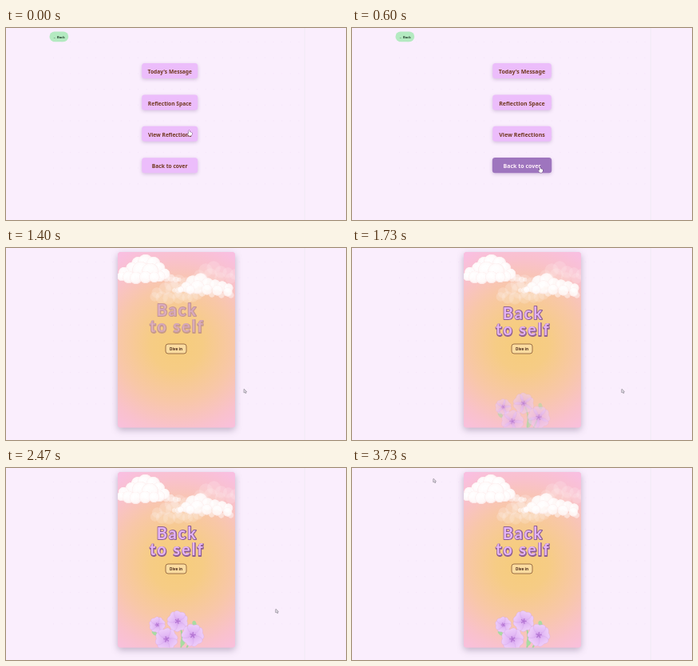
Write an HTML page with a canvas that moves like this. It is 426x240 px and loops after 3.79 s.

```html
<!DOCTYPE html>
<html lang="en">
<head>
<meta charset="utf-8">
<title>Back to self</title>
<style>
  html, body { margin: 0; width: 100%; height: 100%; overflow: hidden; background: #faeefd; }
  canvas { display: block; width: 100vw; height: 100vh; }
</style>
</head>
<body>
<canvas id="stage" width="426" height="240"></canvas>
<script>
const ctx = document.getElementById('stage').getContext('2d');
const LOOP = 3790;
const COVER_AT = 1000;
const FONT = '"Noto Sans", "Open Sans", sans-serif';
const TITLE_FONT = 'Lato, sans-serif';
const COVER = { x: 140, y: 5, w: 147, h: 219.5 };
const MENU = ["Today's Message", 'Reflection Space', 'View Reflections', 'Back to cover'];

const clamp = v => Math.max(0, Math.min(1, v));
const span = (t, from, to) => clamp((t - from) / (to - from));
const mix = (a, b, p) => a + (b - a) * p;
const easeOut = p => 1 - (1 - p) ** 2;
const easeInOut = p => p * p * (3 - 2 * p);
const mixColor = (a, b, p) => `rgb(${a.map((v, i) => Math.round(mix(v, b[i], p)))})`;

function isolated(draw) {
  ctx.save();
  draw();
  ctx.restore();
}

function roundBox(x, y, w, h, r) {
  ctx.beginPath();
  ctx.roundRect(x, y, w, h, r);
}

function ellipse(x, y, rx, ry, angle = 0) {
  ctx.beginPath();
  ctx.ellipse(x, y, rx, ry, angle, 0, Math.PI * 2);
  ctx.fill();
}

function label(text, x, y, size, color, weight = 800, font = FONT) {
  ctx.font = `${weight} ${size}px ${font}`;
  ctx.textAlign = 'center';
  ctx.textBaseline = 'alphabetic';
  ctx.fillStyle = color;
  ctx.fillText(text, x, y);
}

function shadow(color, blur, dy) {
  ctx.shadowColor = color;
  ctx.shadowBlur = blur;
  ctx.shadowOffsetY = dy;
}

function drawPaper() {
  ctx.fillStyle = '#faeefd';
  ctx.fillRect(0, 0, 426, 240);
  ctx.fillStyle = 'rgba(205, 170, 220, 0.13)';
  for (let y = 17; y < 200; y += 19.7)
    for (let x = 59; x < 373; x += 10.6) ctx.fillRect(x, y, 1, 1);
  ctx.fillStyle = '#f3ebf7';
  ctx.fillRect(373.5, 0, 1.5, 240);
}

function drawMenuButton(text, y, hover) {
  const grow = hover * 0.7;
  isolated(() => {
    shadow('rgba(125, 85, 150, 0.3)', 4, 1.5);
    ctx.fillStyle = mixColor([236, 189, 251], [101, 64, 144], hover);
    roundBox(176.2 - grow, y - grow * 0.3, 73.6 + grow * 2, 19 + grow * 0.6, 3.5);
    ctx.fill();
  });
  label(text, 213, y + 13.2, 7, mixColor([112, 56, 30], [255, 240, 250], clamp(hover * 1.8)));
}

function drawMenu(t) {
  ctx.fillStyle = '#b4eac1';
  roundBox(54.5, 4.5, 23.7, 12.7, 6.3);
  ctx.fill();
  label('← Back', 66.3, 12.6, 4, '#1f3a28');

  // The page finishes turning around its left edge.
  const turn = mix(0.951, 1, easeOut(span(t, 60, 270)));
  isolated(() => {
    ctx.translate(54, 0);
    ctx.scale(turn, 1);
    ctx.translate(-54, 0);
    MENU.forEach((text, i) =>
      drawMenuButton(text, 44 + i * 39.4, i === 3 ? span(t, 400, 750) : 0));
  });
}

// Each puff is [x, y, radius]; a soft lower rim gives it volume.
function drawCloud(x, y, alpha, puffs) {
  isolated(() => {
    ctx.globalAlpha = alpha;
    ctx.translate(x, y);
    for (const [px, py, r] of puffs) {
      const fluff = ctx.createRadialGradient(px - r * 0.15, py - r * 0.25, r * 0.3, px, py, r);
      fluff.addColorStop(0, '#ffffff');
      fluff.addColorStop(0.7, 'rgba(255, 251, 251, 0.97)');
      fluff.addColorStop(0.92, 'rgba(253, 238, 238, 0.85)');
      fluff.addColorStop(1, 'rgba(253, 232, 232, 0)');
      ctx.fillStyle = fluff;
      ellipse(px, py, r, r);
    }
  });
}

const LEFT_PUFFS = [
  [25, 11, 9], [34, 9, 10], [44, 11, 9], [51, 17, 8], [17, 17, 8], [7, 22, 7], [4, 27, 6],
  [58, 24, 7], [52, 27, 7], [28, 19, 11], [40, 21, 11], [13, 28, 8], [22, 29, 8], [34, 28, 8], [45, 28, 7]
];
const LEFT_TAIL = [[60, 29, 5], [66, 29, 5], [72, 31, 4], [76, 31, 3]];
const RIGHT_PUFFS = [
  [28, 12, 9], [38, 9, 9], [47, 14, 8], [20, 18, 7], [56, 15, 7], [65, 17, 7],
  [73, 19, 6], [13, 21, 4], [34, 18, 9], [46, 21, 7], [59, 22, 7], [72, 24, 6], [25, 21, 6]
];
const RIGHT_TAIL = [[5, 22, 3], [10, 22, 4], [40, 25, 5], [52, 27, 4], [64, 28, 4], [76, 28, 4]];

function drawClouds(t) {
  const drift = -(t - COVER_AT) / 2700;
  drawCloud(182 - drift, 34, 0.2, LEFT_PUFFS);
  drawCloud(222 - drift, 16, 0.17, RIGHT_PUFFS);
  drawCloud(141 + drift, 8.5, 0.5, LEFT_TAIL);
  drawCloud(141 + drift, 8.5, 0.96, LEFT_PUFFS);
  drawCloud(206 + drift * 0.6, 31, 0.5, RIGHT_TAIL);
  drawCloud(206 + drift * 0.6, 31, 0.9, RIGHT_PUFFS);
}

function drawPetal(r) {
  const color = ctx.createLinearGradient(0, 0, 0, -r);
  color.addColorStop(0, '#cf97e8');
  color.addColorStop(0.35, '#e2b9f5');
  color.addColorStop(1, '#efd0fa');
  ctx.fillStyle = color;
  ctx.strokeStyle = 'rgba(205, 155, 228, 0.55)';
  ctx.lineWidth = 0.5;
  ctx.beginPath();
  ctx.moveTo(0, 0);
  ctx.bezierCurveTo(-r * 0.8, -r * 0.5, -r * 0.65, -r * 1.15, 0, -r * 0.9);
  ctx.bezierCurveTo(r * 0.65, -r * 1.15, r * 0.8, -r * 0.5, 0, 0);
  ctx.fill();
  ctx.stroke();
}

function drawFlower(x, y, r, turn) {
  isolated(() => {
    ctx.translate(x, y);
    ctx.rotate(turn);
    for (let i = 0; i < 5; i++) {
      ctx.rotate(Math.PI * 2 / 5);
      drawPetal(r);
    }
    ctx.fillStyle = '#b273d2';
    for (let i = 0; i < 5; i++) {
      ctx.rotate(Math.PI * 2 / 5);
      ellipse(0, -r * 0.14, r * 0.05, r * 0.16);
    }
  });
}

function drawFlowers(t) {
  const grow = span(t, 1450, 1980);
  if (!grow) return;
  isolated(() => {
    ctx.globalAlpha = grow;
    ctx.translate(0, 12 * (1 - easeOut(grow)));
    ctx.strokeStyle = '#a3d59b';
    ctx.lineWidth = 2;
    ctx.beginPath();
    ctx.moveTo(217, 196);
    ctx.quadraticCurveTo(223, 208, 219, 226);
    ctx.moveTo(232, 212);
    ctx.lineTo(226, 226);
    ctx.stroke();
    ctx.fillStyle = '#a9dba2';
    ellipse(222, 216, 3, 7, 0.3);
    ellipse(236, 195, 2.5, 4, -0.2);
    ellipse(186, 206, 2.5, 4, -0.7);
    drawFlower(189.5, 196, 10, -0.4);
    drawFlower(215, 191.5, 13, 0.3);
    drawFlower(234, 209, 14, 0.1);
    drawFlower(201, 214, 14, -0.25);
  });
}

function drawTitle(t) {
  const alpha = span(t, 1110, 1750);
  if (!alpha) return;
  const lift = -15 * (1 - easeOut(span(t, 1110, 1710)));
  isolated(() => {
    ctx.globalAlpha = alpha;
    ctx.translate(0, lift);
    ctx.lineJoin = 'round';
    ctx.letterSpacing = '1.9px';
    [['Back', 88.5], ['to self', 109.3]].forEach(([text, y]) => {
      ctx.font = `700 20px ${TITLE_FONT}`;
      ctx.textAlign = 'center';
      ctx.strokeStyle = '#8d5d93';
      ctx.lineWidth = 2;
      ctx.strokeText(text, 214.6, y + 0.4);
      label(text, 214.2, y, 20, '#e4b4f5', 700, TITLE_FONT);
    });
  });
}

function drawDiveButton() {
  ctx.fillStyle = '#fbdca0';
  ctx.strokeStyle = '#9c6f45';
  ctx.lineWidth = 1;
  roundBox(200, 120, 26, 12, 3);
  ctx.fill();
  ctx.stroke();
  label('Dive in', 213, 128.2, 4.7, '#472618');
}

function drawCover(t) {
  const { x, y, w, h } = COVER;
  isolated(() => {
    shadow('rgba(95, 75, 110, 0.38)', 9, 3);
    ctx.fillStyle = '#f8c1dc';
    roundBox(x, y, w, h, 4);
    ctx.fill();
  });
  isolated(() => {
    roundBox(x, y, w, h, 4);
    ctx.clip();
    const glow = ctx.createRadialGradient(213.5, 120, 0, 213.5, 120, 132);
    glow.addColorStop(0, '#f6cd7b');
    glow.addColorStop(0.25, '#f6cc85');
    glow.addColorStop(0.55, '#f8c7a8');
    glow.addColorStop(0.8, '#f9c1cc');
    glow.addColorStop(1, '#f9bfe1');
    ctx.fillStyle = glow;
    ctx.fillRect(x, y, w, h);
    drawClouds(t);
    drawFlowers(t);
  });
  drawTitle(t);
  drawDiveButton();
}

function drawPointer(x, y, fill, outline, points) {
  ctx.beginPath();
  points.forEach(([px, py]) => ctx.lineTo(x + px, y + py));
  ctx.closePath();
  ctx.fillStyle = fill;
  ctx.strokeStyle = outline;
  ctx.lineWidth = 0.9;
  ctx.lineJoin = 'round';
  ctx.stroke();
  ctx.fill();
}

const HAND = [[0, 0], [1, 0], [1.2, 2], [4, 2.8], [4, 5], [3, 6.8], [0.4, 6.8], [-1.8, 4], [-1, 3.5], [0, 4.2]];
const ARROW = [[0, 0], [0, 4.4], [1.1, 3.6], [1.9, 5], [2.7, 4.6], [2.1, 3.3], [3.3, 3.1]];

function drawCursor(t) {
  if (t < COVER_AT) {
    const p = easeInOut(span(t, 70, 480));
    drawPointer(mix(229, 235, p), mix(128, 174, p), '#fff', 'rgba(70, 45, 85, 0.75)', HAND);
    return;
  }
  const right = span(t, 1085, 1600);
  const away = span(t, 2970, 3730) ** 1.45;
  const x = mix(mix(235, 338, right), 102, away);
  const y = mix(176.5, 13.5, away);
  drawPointer(x, y, '#d5d0d9', '#77707d', ARROW);
}

function frame(now) {
  const t = now % LOOP;
  drawPaper();
  if (t < COVER_AT) drawMenu(t);
  else drawCover(t);
  drawCursor(t);
  requestAnimationFrame(frame);
}
requestAnimationFrame(frame);
</script>
</body>
</html>
```
